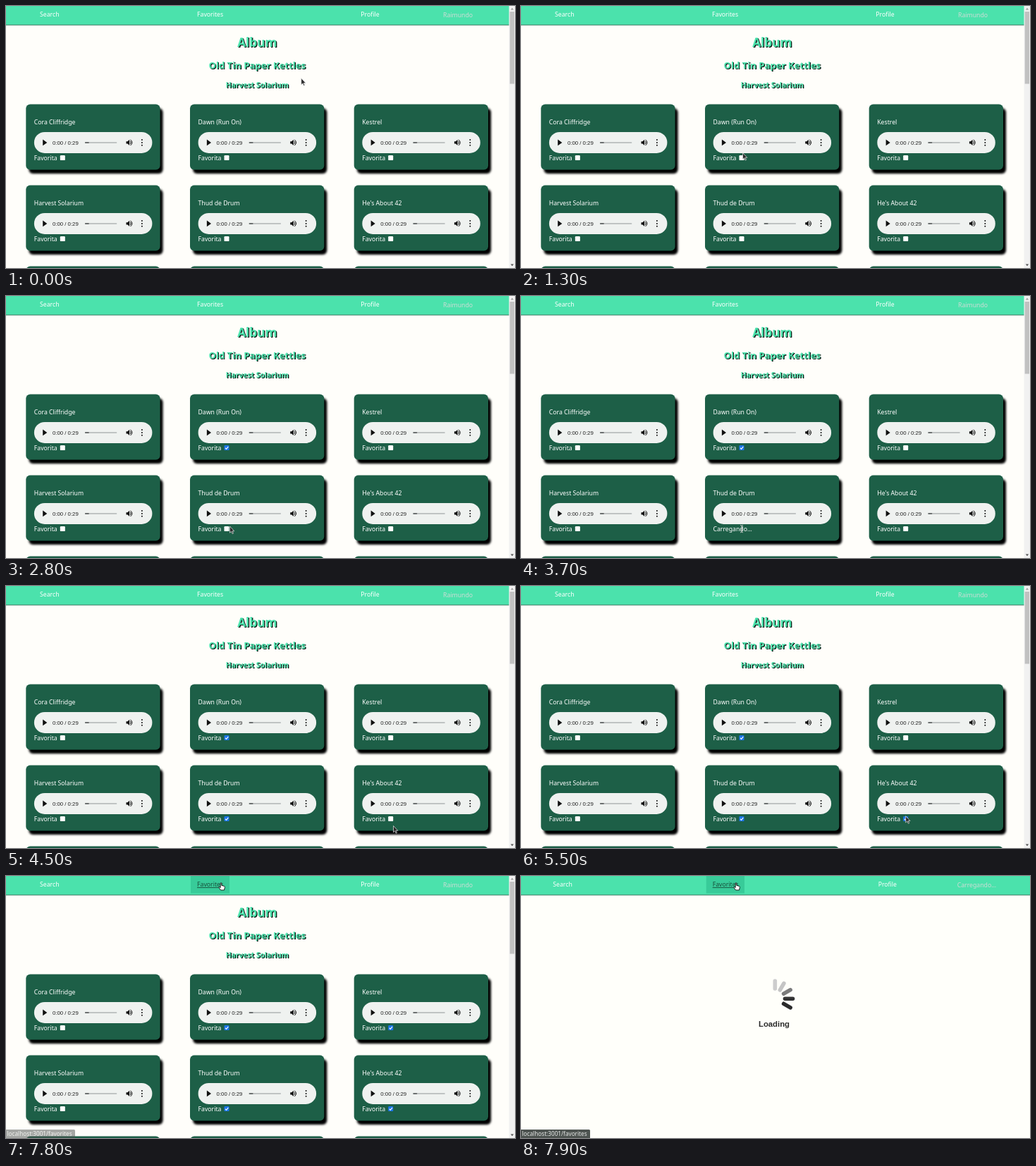
Recreate the animation shown at these times as an HTML page. Size 722x372 px, loop 8 s.

```html
<!DOCTYPE html>
<html lang="pt">
<head>
<meta charset="utf-8">
<title>Album</title>
<style>
html, body { margin: 0; width: 100%; height: 100%; overflow: hidden; background: #fffefa; }
svg { display: block; width: 722px; height: 372px; }
text { font: 8.7px "Noto Sans", "Open Sans", sans-serif; fill: #fff; white-space: pre; }
.head { font-weight: 700; fill: #4be2ac; text-anchor: middle; text-shadow: 1.2px 1.2px .6px #04130d; }
.clock { font: 7.8px "Liberation Sans", Arial, sans-serif; fill: #222; }
.user { fill: #cddcd5; }
.hot { fill: #174f3a; text-decoration: underline; }
.url { font-size: 8.2px; fill: #e6e8e7; }
.wait { font: 700 11.3px "Liberation Sans", Arial, sans-serif; fill: #2b2b2b; text-anchor: middle; }
</style>
</head>
<body>
<svg id="stage" viewBox="0 0 722 372">
  <defs><filter id="blur" x="-10%" y="-20%" width="120%" height="140%"><feGaussianBlur stdDeviation="1.5"/></filter></defs>
</svg>
<script>
const LOOP = 8000, STEP = 100, LOAD = 200;
const HOVER = 7600, STATUS = 7800, LEAVE = 7900;
const stage = document.getElementById('stage');

function add(parent, tag, attrs, text) {
  const el = document.createElementNS('http://www.w3.org/2000/svg', tag);
  for (const k in attrs) el.setAttribute(k, attrs[k]);
  if (text) el.textContent = text;
  parent.appendChild(el);
  return el;
}
const group = (p, x = 0, y = 0) => add(p, 'g', { transform: `translate(${x} ${y})` });
const box = (p, x, y, width, height, fill, rx = 0) => add(p, 'rect', { x, y, width, height, fill, rx });
const label = (p, x, y, str, cls = '') => add(p, 'text', { x, y, class: cls }, str);
const path = (p, d, attrs) => add(p, 'path', { d, ...attrs });
const show = (el, on) => { el.style.display = on ? '' : 'none'; };

// Returns a function that switches the hover state of the middle link
function nav(page, width, [search, favorites, profile, name], user) {
  box(page, 0, 0, width, 27, '#4be2ac');
  box(page, 0, 26.5, width, 1, '#3a7a63');
  const hot = box(page, favorites - 9, 0, 326 - favorites, 24.5, '#38cb99');
  label(page, search, 15, 'Search');
  const link = label(page, favorites, 15, 'Favorites');
  label(page, profile, 15, 'Profile');
  label(page, name, 16, user, 'user');
  return on => { show(hot, on); link.setAttribute('class', on ? 'hot' : ''); };
}

function player(p, x, y) {
  const g = group(p, x, y);
  box(g, 0, 0, 167.5, 30, '#eff2f0', 15);
  path(g, 'M12.3 10.6V19.4L18.4 15Z', { fill: '#111' });
  label(g, 26, 17.8, '0:00 / 0:29', 'clock');
  box(g, 72, 14, 45.5, 2, '#bfc3c3', 1);
  box(g, 72, 14, 6, 2, '#6c7070', 1);
  path(g, 'M130.6 13.4h2l2.6-2.6v8.4l-2.6-2.6h-2Z', { fill: '#111' });
  path(g, 'M136.4 12.9q1.7 2.1 0 4.2M136.6 10.9q4.8 4.1 0 8.2', { fill: 'none', stroke: '#111', 'stroke-width': 1 });
  for (const dy of [-1, 0, 1]) add(g, 'circle', { cx: 153, cy: 15 + 3.8 * dy, r: 1, fill: '#111' });
}

const corner = i => [28.3 + 232.7 * (i % 3), 139.6 + 115 * Math.floor(i / 3)];
const checkbox = i => corner(i).map((v, axis) => v + (axis ? 76 : 52));

function card(p, i, song) {
  const g = group(p, ...corner(i));
  box(g, 4, 5.5, 190.3, 92.8, '#000', 6).setAttribute('filter', 'url(#blur)');
  box(g, 0, 0, 190.3, 92.8, '#1d5f47', 6);
  if (!song) return () => {};
  label(g, 11.5, 28.2, song.name);
  player(g, 11.6, 39.3);
  const idle = group(g);
  label(idle, 11.5, 79.5, 'Favorita');
  const frame = box(idle, 48.5, 72.5, 7, 7, '#fff', 1.2);
  const tick = path(idle, 'M50 76.1l1.5 1.6 2.8-3.4', { fill: 'none', stroke: '#fff', 'stroke-width': 1.1 });
  const busy = label(g, 11.5, 79.5, 'Carregando...');
  return t => {
    const on = t >= song.click + LOAD, loading = t >= song.click && !on;
    show(idle, !loading);
    show(busy, loading);
    show(tick, on);
    frame.setAttribute('fill', on ? '#1a75e8' : '#fff');
  };
}

const songs = [
  { name: 'Cora Cliffridge' },
  { name: 'Dawn (Run On)', click: 1600 },
  { name: 'Kestrel', click: 6700 },
  { name: 'Harvest Solarium' },
  { name: 'Thud de Drum', click: 3700 },
  { name: "He's About 42", click: 5100 }
];

// Album page
const album = group(stage);
box(album, 0, 0, 722, 372, '#fffefa');
const hover = nav(album, 714, [48, 271, 503.3, 620], 'Raimundo');
function heading(y, em, str) {
  label(album, 356.3, y, str, 'head').style.fontSize = 8.6 * em + 'px';
}
heading(58, 2, 'Album');
heading(88.5, 1.53, 'Old Tin Paper Kettles');
heading(115.5, 1.2, 'Harvest Solarium');
const cards = Array.from({ length: 9 }, (_, i) => card(album, i, songs[i]));
box(album, 713.5, 0, 8.5, 372, '#f1f1f1');
box(album, 714.7, 8, 6.3, 102.5, '#c1c1c1');
path(album, 'M718 2.6l2.2 2.8h-4.4Z', { fill: '#a3a3a3' });
path(album, 'M718 369.2l2.2-2.8h-4.4Z', { fill: '#505050' });

// Loading page
const loader = group(stage);
box(loader, 0, 0, 722, 372, '#fffffa');
nav(loader, 722, [45.3, 271.7, 506.7, 618.7], 'Carregando...')(true);
for (let i = 0; i < 5; i++) {
  const shade = Math.round(205 - 162 / (1 + Math.exp(6 - 3 * i)));
  path(loader, 'M360.3 149v11', {
    stroke: `rgb(${shade},${shade},${shade})`, 'stroke-width': 5.6, 'stroke-linecap': 'round',
    transform: `rotate(${30 * i} 360.3 174.2)`
  });
}
label(loader, 359, 214, 'Loading', 'wait');

const status = group(stage);
box(status, -2, 360, 100, 14, '#4d5350', 1.5);
label(status, 1.5, 369, 'localhost:3001/favorites', 'url');

// Pointers
const cursor = group(stage);
const shapes = {
  arrow: path(cursor, 'M0 0V9.2L2.1 7.3 3.6 10.6 5 10 3.5 6.8H6.3Z', { fill: '#2a2a2a', stroke: '#e8e8e8', 'stroke-width': .7 }),
  beam: path(cursor, 'M-2-5.2q2 0 2 1.2V4q0 1.2-2 1.2M2-5.2q-2 0-2 1.2V4q0 1.2 2 1.2', { fill: 'none', stroke: '#b9c4bf', 'stroke-width': 1 }),
  hand: path(cursor, 'M-.8 0Q0-1 .8 0V3.4L4.6 4.4Q5.6 4.8 5.3 6.4L4.5 10H-.4L-3 6.6Q-3.2 5.2-1.8 5.8L-.8 6.6Z', { fill: '#fff', stroke: '#111', 'stroke-width': .9 })
};

// Pointer moves: start, end, where to
const home = [418.8, 102.6];
const moves = [
  [400, 1300, [314.5, 208.5]],
  [1300, 1500, checkbox(1)],
  [1800, 2200, [325, 303]],
  [2400, 2800, [317.5, 327]],
  [3100, 3500, checkbox(4)],
  [4100, 4500, [549.5, 340.5]],
  [4600, 4900, checkbox(5)],
  [5400, 6300, checkbox(2)],
  [6800, 6900, [429, 97]],
  [7100, 7700, [305, 10]]
];
const ease = k => k * k * (3 - 2 * k);

function place(t) {
  let at = home;
  for (const [start, end, to] of moves) {
    const k = ease(Math.min(1, Math.max(0, (t - start) / (end - start))));
    at = at.map((v, axis) => v + (to[axis] - v) * k);
  }
  return at;
}

function draw(t) {
  const gone = t >= LEAVE;
  show(album, !gone);
  show(loader, gone);
  hover(t >= HOVER);
  cards.forEach(update => update(t));
  status.setAttribute('opacity', gone ? 1 : t >= STATUS ? .5 : 0);
  const busy = songs.some(s => t >= s.click && t < s.click + LOAD);
  const kind = t >= HOVER ? 'hand' : busy ? 'beam' : 'arrow';
  for (const k in shapes) show(shapes[k], k === kind);
  cursor.setAttribute('transform', `translate(${place(t)})`);
}

const begin = performance.now();
function tick(now) {
  draw(Math.floor(Math.max(0, now - begin) % LOOP / STEP) * STEP);
  requestAnimationFrame(tick);
}
draw(0);
requestAnimationFrame(tick);
</script>
</body>
</html>
```
